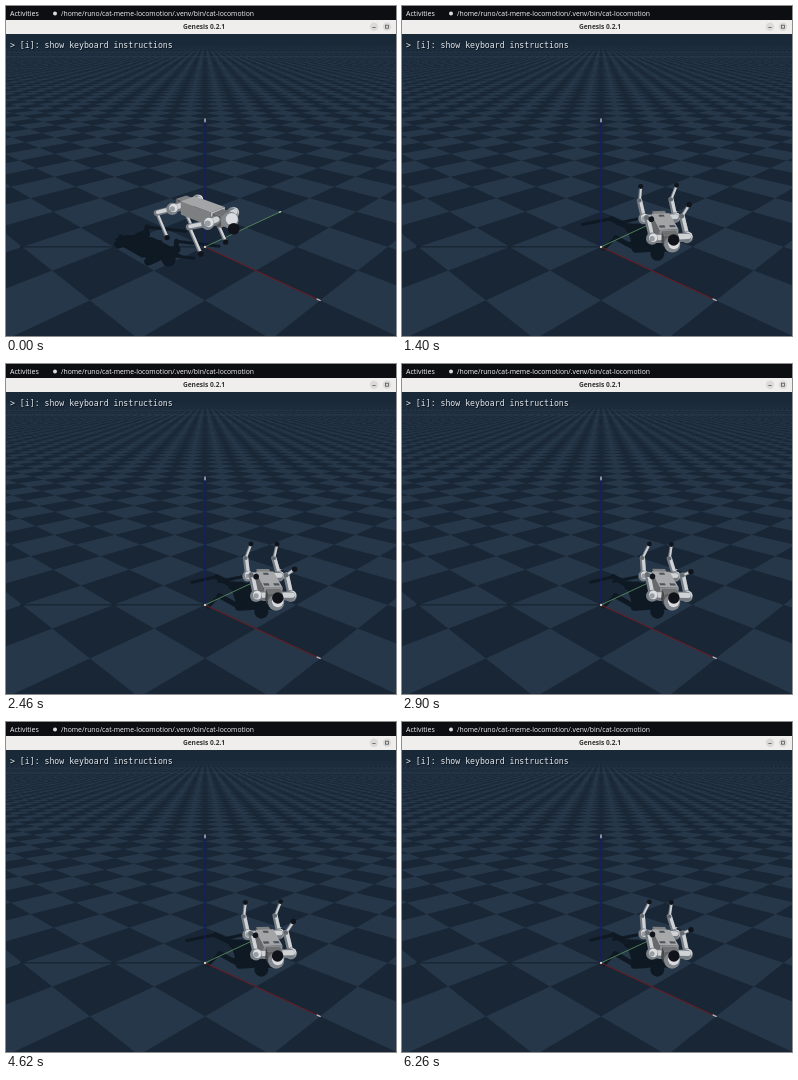
Recreate the animation shown at these times as an HTML page with a canvas. Size 390x330 px, loop 6.28 s.

```html
<!DOCTYPE html>
<html lang="en">
<head>
<meta charset="utf-8">
<title>Genesis viewer</title>
<style>
html, body { margin: 0; width: 100%; height: 100%; overflow: hidden; background: #1b2a39; }
canvas, svg { position: absolute; left: 0; top: 0; width: 390px; height: 330px; }
.ui { font-family: "Open Sans", "Noto Sans", sans-serif; }
.mono { font-family: "DejaVu Sans Mono", monospace; font-size: 8.2px; }
</style>
</head>
<body>
<canvas id="view" width="390" height="330"></canvas>
<svg viewBox="0 0 390 330">
  <rect width="390" height="14" fill="#0c0e12"/>
  <text class="ui" x="4" y="10" font-size="7" fill="#f4f4f4">Activities</text>
  <circle cx="49" cy="7.5" r="2" fill="#dcdcdc"/>
  <text class="ui" x="55" y="10" font-size="6.8" fill="#f4f4f4">/home/runo/cat-meme-locomotion/.venv/bin/cat-locomotion</text>
  <rect y="14" width="390" height="14" fill="#efeeed"/>
  <text class="ui" x="198" y="23.4" font-size="6.6" font-weight="700" text-anchor="middle" fill="#333">Genesis 0.2.1</text>
  <g fill="#dbdad9"><circle cx="368" cy="20.7" r="4.2"/><circle cx="381" cy="20.7" r="4.2"/></g>
  <g fill="none" stroke="#555" stroke-width=".8"><path d="M366.4 21.5h3.2"/><rect x="379.5" y="19.2" width="3" height="3"/></g>
  <text class="mono" x="4.7" y="43" fill="#0a121c">&gt; [i]: show keyboard instructions</text>
  <text class="mono" x="4" y="42.3" fill="#e3e9ee">&gt; [i]: show keyboard instructions</text>
</svg>
<script>
const W = 390, H = 330, LOOP = 6280, RAD = Math.PI / 180;
const ctx = document.getElementById('view').getContext('2d');

// World in metres: u right, v away from the camera, z up.
const CX = 199, HORIZON = 35, FOCAL = 425, EYE = 1.53, DIST = 3.29, COS = 0.96, SIN = 0.28;
const depth = ([, v, z]) => DIST + COS * v - SIN * z;
const project = p => {
  const d = depth(p);
  return [CX + FOCAL * p[0] / d, HORIZON + FOCAL / COS * (EYE - p[2]) / d];
};
const cast = ([u, v, z]) => [u - 1.43 * Math.max(0, z), v, 0];
const LIGHT = [0.82, 0, 0.57];

const add = (a, b, k = 1) => a.map((x, i) => x + b[i] * k);
const dot = (a, b) => a.reduce((s, x, i) => s + x * b[i], 0);
const ease = k => { k = Math.min(1, Math.max(0, k)); return k * k * (3 - 2 * k); };
const grey = k => { const c = Math.round(Math.min(1, k) * 255); return `rgb(${c},${c + 2},${c + 4})`; };

// Half-metre checkers, seen along their diagonal
function isLight(x, y) {
  const d = FOCAL / COS * EYE / (y - HORIZON);
  const v = (d - DIST) / COS, u = (x - CX) * d / FOCAL;
  return ((Math.floor((u - v) * Math.SQRT2) + Math.floor((u + v) * Math.SQRT2)) & 1) === 0;
}

function makeFloor() {
  const c = document.createElement('canvas');
  c.width = W; c.height = H;
  const g = c.getContext('2d'), img = g.createImageData(W, H);
  const dark = [24, 38, 53], light = [38, 55, 73], sky = [26, 41, 56], N = 4;
  for (let y = 0; y < H; y++) for (let x = 0; x < W; x++) {
    let n = 0;
    if (y > HORIZON) for (let k = 0; k < N * N; k++)
      n += isLight(x + (k % N + 0.5) / N, y + (Math.floor(k / N) + 0.5) / N);
    const m = n / (N * N), fog = ease((y - HORIZON) / 14);
    for (let k = 0; k < 3; k++) {
      const col = dark[k] + (light[k] - dark[k]) * m;
      img.data[(y * W + x) * 4 + k] = sky[k] + (col - sky[k]) * fog;
    }
    img.data[(y * W + x) * 4 + 3] = 255;
  }
  g.putImageData(img, 0, 0);
  return c;
}
const floor = makeFloor();

function line(a, b, width, color) {
  ctx.beginPath();
  ctx.moveTo(...a); ctx.lineTo(...b);
  ctx.lineWidth = width; ctx.strokeStyle = color;
  ctx.stroke();
}
function disc([x, y], r, color) {
  ctx.beginPath();
  ctx.arc(x, y, r, 0, Math.PI * 2);
  ctx.fillStyle = color; ctx.fill();
}
function poly(pts, color) {
  ctx.beginPath();
  pts.forEach(p => ctx.lineTo(...p));
  ctx.closePath();
  ctx.fillStyle = color; ctx.fill();
}

function drawAxes() {
  const r = Math.SQRT1_2, o = [0, 0, 0];
  line(project(cast([0, 0, 1])), project(o), 0.8, '#101a24');
  const axis = (tip, color, w) => {
    line(project(o), project(tip), w, color);
    line(project(tip.map(x => x * 0.98)), project(tip), 1.5, '#aeb6bf');
  };
  axis([0, 0, 1], '#161a72', 1.1);
  axis([r, -r, 0], '#651c23', 1.1);
  axis([r, r, 0], '#568a5e', 0.9);
  disc(project(o), 1.2, '#c9ccbd');
}

// Body placement: a sideways roll onto the back
function bodyAt(t) {
  const p = ease((t - 80) / 1360);
  const beat = p === 1 ? 0.5 - 0.5 * Math.cos((t - 2020) / 258.5 * Math.PI * 2) : 0;
  const yaw = (-45 - 41 * p) * RAD, roll = (180 * p + 3 * beat) * RAD;
  const side = [-Math.sin(yaw), Math.cos(yaw), 0];
  const fwd = [Math.cos(yaw), Math.sin(yaw), 0];
  const left = add(side.map(x => x * Math.cos(roll)), [0, 0, 1], -Math.sin(roll));
  const up = add(side.map(x => x * Math.sin(roll)), [0, 0, 1], Math.cos(roll));
  const pos = [-0.02 + 0.53 * Math.sin(p * Math.PI / 2), 0.17 * p, 0.3 - 0.215 * p];
  const at = (f, l, n) => add(add(add(pos, fwd, f), left, l), up, n);
  return { p, beat, fwd, left, up, at };
}

// Joints of one leg; front and side are +1 or -1.
function legOf(body, front, side) {
  const { p, beat, fwd, left, up, at } = body;
  const kick = Math.sin(p * Math.PI);
  let thigh = 65 - 25 * kick, calf = 35 - 20 * kick, spread = 4 * p;
  if (front < 0) spread -= 14 * beat;
  else calf += p * p * (side > 0 ? 35 : 8 + 18 * beat);
  const s = Math.sin(spread * RAD) * side, c = Math.cos(spread * RAD);
  const down = up.map((x, i) => left[i] * s - x * c);
  const reach = (from, deg) => add(add(from, down, 0.213 * Math.cos(deg * RAD)), fwd, 0.213 * Math.sin(deg * RAD));
  const hip = at(0.19 * front, 0.135 * side, 0);
  const knee = reach(hip, -thigh);
  return { hip, knee, foot: reach(knee, calf), inner: at(0.19 * front, 0.06 * side, 0) };
}

// Faces of a box given by its centre and half sizes in the body frame
function boxFaces(body, centre, half) {
  const axes = [body.fwd, body.left, body.up], faces = [];
  for (let k = 0; k < 3; k++) for (const s of [1, -1]) {
    const a = (k + 1) % 3, b = (k + 2) % 3;
    const pts = [[1, 1], [1, -1], [-1, -1], [-1, 1]].map(([i, j]) => {
      const q = centre.slice();
      q[k] += s * half[k]; q[a] += i * half[a]; q[b] += j * half[b];
      return body.at(...q);
    });
    faces.push({ pts, normal: axes[k].map(x => x * s) });
  }
  return faces;
}

const eye = [0, -DIST * COS, EYE];
const shade = n => 0.36 + 0.38 * Math.max(0, dot(n, LIGHT)) - 0.12 * n[1];

function drawBox(faces, tint) {
  for (const { pts, normal } of faces)
    if (dot(normal, add(eye, pts[0], -1)) > 0) poly(pts.map(project), grey(shade(normal) * tint));
}

function tube(a, b, size) {
  const w = size * FOCAL / depth(a), p = project(a), q = project(b);
  const lit = ([x, y]) => [x + w * 0.16, y - w * 0.1];
  line(p, q, w, '#747a81');
  line(lit(p), lit(q), w * 0.58, '#d0d3d6');
}
function ball(c, size, base, top) {
  const r = size * FOCAL / depth(c), [x, y] = project(c);
  disc([x, y], r, base);
  if (top) disc([x + r * 0.2, y - r * 0.15], r * 0.72, top);
}

function drawRobot(t) {
  const body = bodyAt(t), { at } = body;
  const legs = [];
  for (const front of [1, -1]) for (const side of [1, -1]) legs.push(legOf(body, front, side));
  const boxes = [
    { c: [0, 0, 0], h: [0.16, 0.075, 0.055], tint: 1.1 },
    { c: [0.2, 0, 0], h: [0.04, 0.055, 0.045], tint: 0.75 },
    { c: [-0.2, 0, 0], h: [0.04, 0.055, 0.045], tint: 0.85 }
  ].map(b => ({ ...b, faces: boxFaces(body, b.c, b.h) }));
  const head = at(0.28, 0, 0.01), face = at(0.315, 0, -0.045);

  const dark = '#0f1923', ground = p => project(cast(p));
  for (const b of boxes) for (const f of b.faces) poly(f.pts.map(ground), dark);
  disc(ground(head), 7, dark);
  for (const { hip, knee, foot, inner } of legs) {
    line(ground(inner), ground(hip), 8, dark);
    line(ground(hip), ground(knee), 5, dark);
    line(ground(knee), ground(foot), 3, dark);
  }
  drawAxes();

  const parts = [];
  const part = (c, draw) => parts.push({ d: depth(c), draw });
  const mid = (a, b) => add(a, b).map(x => x / 2);
  for (const b of boxes) part(at(...b.c), () => drawBox(b.faces, b.tint));
  // Battery cover and gaps on the belly
  if (dot(body.up, add(eye, at(0, 0, -0.06), -1)) < 0) part(at(0.01, 0, -0.09), () => {
    for (const [x, y] of [[0.1, 0.04], [0.1, -0.04], [-0.11, 0]])
      poly([[1, 1], [1, -1], [-1, -1], [-1, 1]].map(([i, j]) =>
        project(at(x + i * 0.02, y + j * 0.022, -0.056))), '#4d535a');
  });
  part(head, () => ball(head, 0.06, '#82878d', '#d9dbde'));
  part(face, () => ball(face, 0.042, '#10141a'));
  for (const { hip, knee, foot, inner } of legs) {
    part(inner, () => tube(inner, hip, 0.07));
    part(hip, () => { ball(hip, 0.046, '#7b8188', '#dcdee0'); ball(hip, 0.02, '#989da3'); });
    part(mid(hip, knee), () => tube(hip, knee, 0.046));
    part(mid(knee, foot), () => { tube(knee, foot, 0.027); ball(knee, 0.018, '#646a71'); });
    part(foot, () => ball(foot, 0.021, '#11151b'));
  }
  parts.sort((a, b) => b.d - a.d).forEach(p => p.draw());
}

let start;
function tick(now) {
  start ??= now;
  const t = Math.floor(((now - start) % LOOP) / 20) * 20;
  ctx.lineCap = ctx.lineJoin = 'round';
  ctx.drawImage(floor, 0, 0);
  drawRobot(t);
  requestAnimationFrame(tick);
}
requestAnimationFrame(tick);
</script>
</body>
</html>
```
